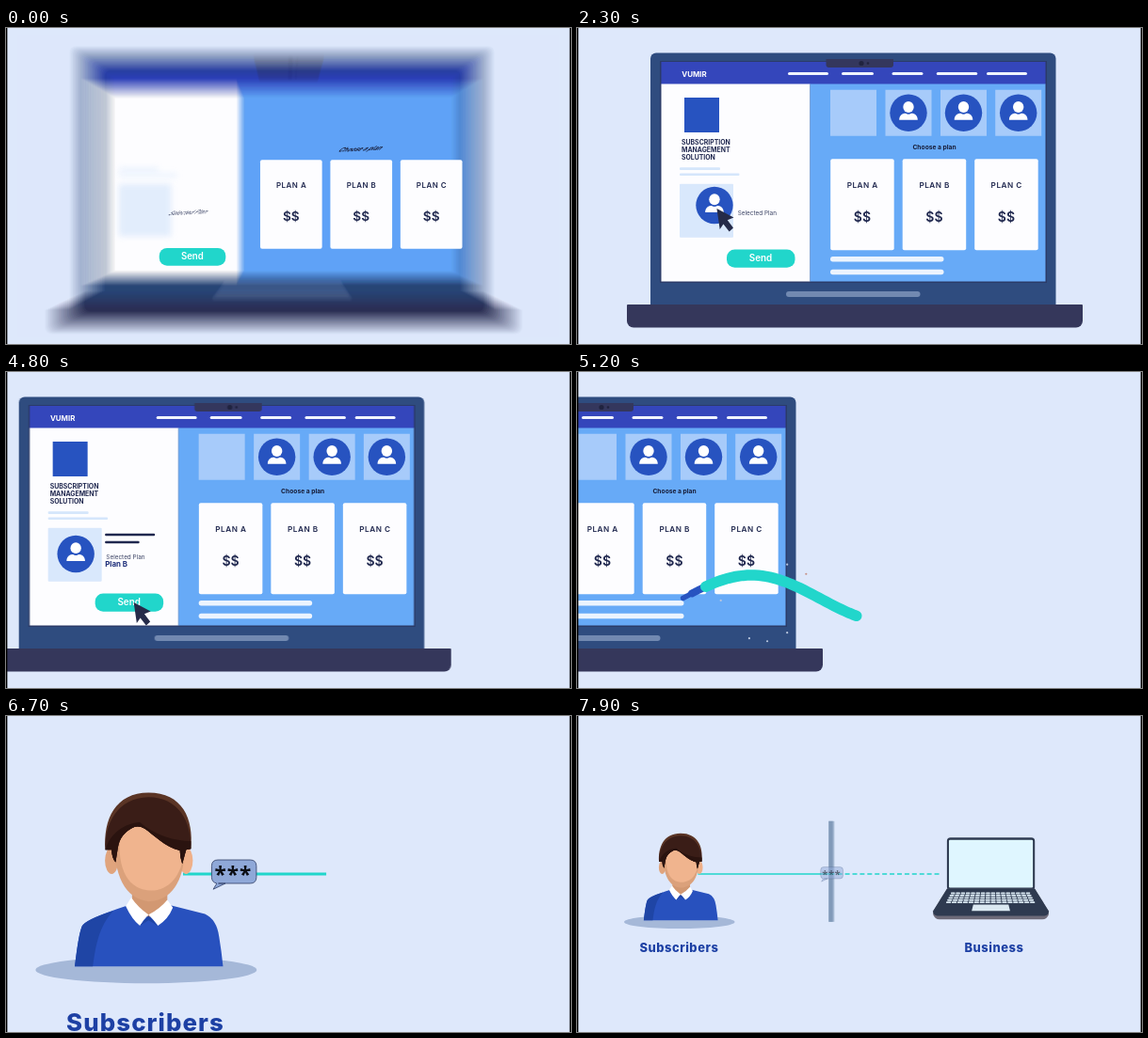
These frames come from a looping animation (600 by 336 pixels, 8 s). An HTML page with a canvas:

```html
<!DOCTYPE html>
<html lang="en">
<head>
<meta charset="utf-8">
<title>Subscription flow</title>
<style>
html, body { margin: 0; width: 100%; height: 100%; overflow: hidden; background: #dee8fb; }
canvas { display: block; width: 600px; height: 336px; }
</style>
</head>
<body>
<canvas id="stage"></canvas>
<script>
const W = 600, H = 336, LOOP = 8000;
const BG = '#dee8fb', BLUE = '#2753c0', TEAL = '#21d6cb', INK = '#20284f', WHITE = '#fdfdff';
const FONT = 'Inter, "Open Sans", sans-serif';
const ratio = window.devicePixelRatio || 1;

function makeCanvas(el) {
  el.width = W * ratio;
  el.height = H * ratio;
  const c = el.getContext('2d');
  c.scale(ratio, ratio);
  return c;
}
const stage = document.getElementById('stage');
const ctx = makeCanvas(stage);
const shell = document.createElement('canvas');

// Timing helpers
const clamp = v => Math.max(0, Math.min(1, v));
const span = (t, a, b) => clamp((t - a) / (b - a));
const mix = (a, b, p) => a + (b - a) * p;
const easeOut = p => 1 - (1 - p) ** 3;
const inOut = (p, n = 3) => p < .5 ? (2 * p) ** n / 2 : 1 - (2 - 2 * p) ** n / 2;
function pop(t, start) {
  const p = span(t, start, start + 400);
  return p < .6 ? 1.12 * Math.sin(p / .6 * Math.PI / 2) : mix(1.12, 1, inOut((p - .6) / .4, 2));
}
// Springy entrance: rises past full size, then settles
const zoomIn = t => 1 + .6 * Math.exp(-t / 110) * Math.sin((t - 6) / 110);

// Drawing helpers
function box(c, x, y, w, h, fill, r = 0) {
  c.fillStyle = fill;
  c.beginPath();
  c.roundRect(x, y, w, h, r);
  c.fill();
}
function oval(x, y, rx, ry, fill) {
  ctx.fillStyle = fill;
  ctx.beginPath();
  ctx.ellipse(x, y, rx, ry, 0, 0, Math.PI * 2);
  ctx.fill();
}
function shape(d, fill) {
  ctx.fillStyle = fill;
  ctx.fill(new Path2D(d));
}
function label(str, x, y, size, weight = 600, fill = INK, align = 'left', spacing = 0) {
  ctx.font = `${weight} ${size}px ${FONT}`;
  ctx.letterSpacing = spacing + 'px';
  ctx.textAlign = align;
  ctx.textBaseline = 'alphabetic';
  ctx.fillStyle = fill;
  ctx.fillText(str, x, y);
}
function scaled(x, y, s, draw) {
  if (s <= 0) return;
  ctx.save();
  ctx.translate(x, y);
  ctx.scale(s, s);
  draw();
  ctx.restore();
}

// Big laptop
function paintShell() {
  const c = makeCanvas(shell);
  box(c, 0, 0, W, H, BG);
  box(c, 78, 26.5, 430.5, 275, '#2f4c7f', 6);
  box(c, 88, 35, 411, 236, '#2b3b68');
  box(c, 89.5, 36, 408, 24, '#3446bb');
  box(c, 89.5, 59.5, 158, 210, WHITE);
  box(c, 247.5, 59.5, 250, 210, '#67aaf7');
  box(c, 264.5, 33, 71.5, 9, '#34375d', [0, 0, 3, 3]);
  c.fillStyle = '#20233f';
  c.beginPath();
  c.arc(302, 37.5, 2.6, 0, 7);
  c.arc(309, 37.5, 1.3, 0, 7);
  c.fill();
  box(c, 222, 280, 142.5, 6, '#7289b1', 3);
  box(c, 53, 294, 484, 24.5, '#35375b', [1, 1, 7, 7]);
}
paintShell();

// Averages the shell over a short shutter time
function drawShell(t) {
  const lo = zoomIn(t - 15), hi = zoomIn(t + 15);
  const n = Math.abs(hi - lo) > .002 ? 24 : 1;
  for (let i = 0; i < n; i++) {
    const s = n > 1 ? mix(lo, hi, i / (n - 1)) : 1;
    ctx.globalAlpha = 1 / (i + 1);
    scaled(298, 178, s, () => ctx.drawImage(shell, -298, -178, W, H));
  }
  ctx.globalAlpha = 1;
}

function avatar(x, y, s) {
  scaled(x, y, s, () => {
    oval(0, 0, 19.7, 19.7, BLUE);
    oval(0, -6.3, 5.7, 5.9, '#fff');
    shape('M-9.8 7.5C-9.8 2 -6 .4 -3 .4Q0 2.4 3 .4C6 .4 9.8 2 9.8 7.5Z', '#fff');
  });
}

function cursor(t) {
  if (t < 1000) return;
  const stops = [
    [1000, -20, 215], [1650, 296, 94], [1800, 296, 94], [2450, 141, 197],
    [2800, 141, 197], [3450, 362, 199], [4000, 362, 199], [4340, 200, 245], [8000, 200, 245]
  ];
  let x = 0, y = 0;
  for (let i = 1; i < stops.length; i++) {
    const [a, ax, ay] = stops[i - 1], [b, bx, by] = stops[i];
    if (t >= a && t <= b) {
      const p = inOut((t - a) / (b - a));
      x = mix(ax, bx, p);
      y = mix(ay, by, p);
    }
  }
  const press = at => Math.sin(span(t, at, at + 200) * Math.PI) * .16;
  const s = 1 - press(1630) - press(3470) - press(4360);
  scaled(x, y, s, () => shape('M0 0L18 9.5L11.3 12.3L17.5 20.5L13.2 24.5L7 16.5L3.2 22Z', '#252b49'));
}

function flipText(str, x, y, size, weight, fill, p) {
  ctx.save();
  ctx.translate(x, y);
  ctx.transform(1, -.05 * (1 - p), -1.2 * (1 - p), 1, 0, 0);
  if (p < 1) ctx.filter = `blur(${.7 * (1 - p)}px)`;
  label(str, 0, size * .36, size, weight, fill, 'center');
  ctx.restore();
}

function leftPanel(t, p) {
  scaled(132, 92, pop(t, 120), () => box(ctx, -18, -18, 37, 37, BLUE));
  ['SUBSCRIPTION', 'MANAGEMENT', 'SOLUTION'].forEach((word, i) => {
    ctx.globalAlpha = span(t, 150 + i * 70, 400 + i * 70);
    label(word, 111, 123.5 + i * 8.1, 6.9, 700);
  });
  ctx.globalAlpha = mix(.75, 1, p);
  ctx.save();
  if (p < 1) ctx.filter = `blur(${3 * (1 - p)}px)`;
  ctx.translate(6 * (1 - p), 0);
  box(ctx, 109, 148.3, 43, 2.6, '#d5e6fb', 1);
  box(ctx, 109, 154.5, 63.5, 2.6, '#d5e6fb', 1);
  box(ctx, 109, 165.7, 57, 57, '#d9e8fc', 1);
  ctx.restore();
  ctx.globalAlpha = 1;
  flipText('Selected Plan', 191.3, 196.5, 6.4, 400, '#3b4364', p);

  const l1 = easeOut(span(t, 2450, 2750)), l2 = easeOut(span(t, 2580, 2880));
  if (l1) box(ctx, 169.5, 171.7, 53 * l1, 2.5, INK, 1);
  if (l2) box(ctx, 169.5, 179.7, 36.5 * l2, 2.5, INK, 1);
  scaled(169.5, 206.5, pop(t, 3500), () => label('Plan B', 0, 0, 7.9, 700, '#1b2c78'));

  const press = 1 - .08 * Math.sin(span(t, 4360, 4560) * Math.PI);
  scaled(195, 245, press, () => {
    box(ctx, -36, -9.5, 72.5, 19.3, TEAL, 8.5);
    label('Send', 0, 3.4, 9.9, 600, '#fff', 'center');
  });
}

function rightPanel(t, p) {
  [293.5, 352, 410.5, 468.7].forEach((x, i) => {
    const s = pop(t, 100 + i * 75);
    scaled(x, 90.3, s, () => box(ctx, -24.5, -24.5, 49, 49, '#a7cbfa'));
    if (i) avatar(x, 90.3, s);
  });
  flipText('Choose a plan', 379.5, 127, 6.7, 700, '#161b36', p);
  ['A', 'B', 'C'].forEach((plan, i) => {
    const x = 269.2 + i * 76.5;
    box(ctx, x, 139.3, 67.5, 97, WHITE, 2);
    label('PLAN ' + plan, x + 34, 169.8, 8.2, 600, INK, 'center', .5);
    label('$$', x + 33.7, 206, 14, 600, INK, 'center');
  });
  for (let i = 0; i < 2; i++) {
    const w = 120.5 * easeOut(span(t, 250 + i * 120, 600 + i * 120));
    if (w) box(ctx, 269, 243 + i * 13.8, w, 5.4, '#ecf4fe', 2.7);
  }
}

function header(t) {
  scaled(124.5, 51.8, pop(t, 180), () => label('VUMIR', 0, 0, 7.9, 700, '#fff', 'center'));
  [[245.5, 43], [298, 34], [351, 33], [403.5, 43.5], [456.5, 43]].forEach(([x, w], i) => {
    scaled(x, 48.5, pop(t, 300 + i * 130), () => box(ctx, -w / 2, -1.6, w, 3.2, '#f0f4ff', 1.6));
  });
}

function panX(t) {
  return -276 * inOut(span(t, 4580, 5150)) - 290 * span(t, 5380, 5700) ** 2;
}

function checkout(t) {
  ctx.save();
  ctx.translate(panX(t), 0);
  drawShell(t);
  const p = easeOut(span(t, 0, 400));
  scaled(298, 178, zoomIn(t), () => {
    ctx.translate(-298, -178);
    header(t);
    rightPanel(t, p);
    leftPanel(t, p);
    const drag = inOut(span(t, 1800, 2450));
    avatar(mix(293.5, 138.5, drag), mix(90.3, 193.5, drag), pop(t, 100));
    cursor(t);
  });
  ctx.restore();
}

// Flying ribbon: a wave to the right that curls back to the centre
function flight(u) {
  const x = mix(-81, 400, Math.min(u, 1));
  const y = 216 + 25 * (1 - Math.cos(.0214 * (x - 185)));
  if (u <= 1) return [x, y];
  const a = (u - 1) * Math.PI;
  return [400 + 180 * Math.sin(a) - 66 * (u - 1), 200 + 57 * Math.cos(a)];
}
function strand(a, b, width, color) {
  if (b <= a) return;
  ctx.beginPath();
  for (let i = 0; i <= 40; i++) ctx.lineTo(...flight(mix(a, b, i / 40)));
  ctx.lineWidth = width;
  ctx.lineCap = ctx.lineJoin = 'round';
  ctx.strokeStyle = color;
  ctx.stroke();
}
function ribbon(t) {
  if (t < 4980 || t > 5520) return;
  const head = Math.min(2, .78 + (t - 5200) * .0055);
  const tail = Math.max(0, .397 + (t - 5200) * .0055);
  const joint = Math.min(head, tail + .05);
  if (tail < head) {
    strand(tail, joint, 5.5, BLUE);
    strand(mix(tail, joint, .4), joint, 8, BLUE);
    strand(joint, head, 11.5, TEAL);
  }
  const p = span(t, 5050, 5350);
  ctx.globalAlpha = Math.sin(p * Math.PI);
  [[243, 215], [223, 205], [223, 277], [183, 283], [202, 286], [153, 243]].forEach(([x, y], i) => {
    const k = p * 2;
    oval(mix(195, x, k), mix(250, y, k), 1.1, 1.1, i ? '#b9c6de' : '#c58f84');
  });
  ctx.globalAlpha = 1;
}

// Subscriber to business
function person() {
  const hairline = 'L316 137L311 155Q308 146 308 138C289 134 274 117 263 110Q256 106 250 108Q232 116 229 134L226 153Q221 147 221 137Z';
  oval(265, 290.5, 141, 17, '#a5b8d8');
  shape('M174 286C177 263 179 246 183 235Q187 226 242 208H296L340 219Q355 226 358 248Q361 266 363 286Z', '#2851be');
  shape('M174 286C177 263 179 246 183 235Q187 226 223 215C205 235 201 257 197 286Z', '#1f45a5');
  shape('M247 186H292V205L268 224L247 203Z', '#d29872');
  oval(221, 151, 8.5, 17, '#e0a47d');
  oval(316, 151, 8.5, 17, '#efb089');
  shape('M224 118C223 170 238 200 268 203C297 202 313 178 314 138L300 100H238Z', '#dba17b');
  shape('M232 118C227 165 244 191 275 189C298 186 312 166 314 134L300 100H240Z', '#f0b48e');
  shape('M246 198L239 209Q247 226 257 234Q262 226 268 220Q254 210 246 198Z', '#fff');
  shape('M292 201L299 211Q293 226 280 234Q274 226 268 220Q282 213 292 201Z', '#fff');
  shape('M257 234L268 221L280 234L268 227Z', '#1f45a5');
  shape('M213 137C210 98 226 64 268 64C311 64 326 97 322 136' + hairline, '#5a3425');
  shape('M213 137C212 104 228 71 268 70C306 70 323 101 322 136' + hairline, '#3a1d17');
  shape('M213 137C219 116 238 103 257 102C276 119 302 126 322 126V136' + hairline, '#2a130f');
}

function notebook() {
  box(ctx, 947, 75, 224, 135, '#2e3a50', 9);
  box(ctx, 952, 81, 214, 122, '#dff6ff', 3);
  shape('M947 206H1171L1206 262V272Q1202 284 1190 284H928Q916 284 912 272V262Z', '#6d6a78');
  shape('M947 206H1171L1206 262V268Q1202 275 1190 275H928Q916 275 912 268V262Z', '#2e3a50');
  for (let r = 0; r < 5; r++) {
    const half = 102 + r * 3, step = half * 2 / 16;
    for (let k = 0; k < 16; k++) box(ctx, 1059 - half + k * step, 215 + r * 5.8, step - 2, 4.4, '#d7e6f0', 1);
  }
  shape('M1014 246H1104L1108 262H1010Z', '#dbe9f2');
}

function bubble(t) {
  const move = 295 * span(t, 6300, 7900) ** 2;
  ctx.globalAlpha = 1 - .5 * span(t, 7780, 7900);
  scaled(358.5 + move, 165, pop(t, 5690), () => {
    const d = 'M-20 15H20.5Q28.5 15 28.5 7V-7Q28.5 -15 20.5 -15H-20.5Q-28.5 -15 -28.5 -7V7Q-28.5 13.5 -22 15L-26.5 22.5L-11 15Z';
    shape(d, '#8fa8d8');
    ctx.lineWidth = 1;
    ctx.strokeStyle = '#34436a';
    ctx.stroke(new Path2D(d));
    ctx.font = '700 27px "Open Sans", "Noto Sans", sans-serif';
    ctx.letterSpacing = '1.2px';
    ctx.textAlign = 'center';
    ctx.fillStyle = '#0b0d14';
    ctx.fillText('***', -1, 13.5);
  });
  ctx.globalAlpha = 1;
}

function wire(a, b, dash) {
  if (b <= a) return;
  ctx.beginPath();
  ctx.moveTo(a, 168);
  ctx.lineTo(b, 168);
  ctx.lineWidth = 3.6;
  ctx.lineCap = 'butt';
  ctx.strokeStyle = TEAL;
  ctx.setLineDash(dash);
  ctx.stroke();
  ctx.setLineDash([]);
}

function exchange(t) {
  if (t < 5500) return;
  const p = inOut(span(t, 6100, 7920), 1.35);
  const zoom = mix(1, .415, p);
  const focus = mix(300, 725, p ** .85);
  ctx.save();
  ctx.translate(300, 168);
  ctx.scale(zoom, zoom);
  ctx.translate(-focus, -168);

  const grow = easeOut(span(t, 6800, 7000));
  if (grow) {
    box(ctx, 645, 161.5 - 128.5 * grow, 15, 257 * grow, '#a4b9d2');
    box(ctx, 646, 161.5 - 128.5 * grow, 10, 257 * grow, '#819ab9');
  }
  if (t > 5800) {
    wire(312, mix(312, 328, span(t, 5800, 6080)) + 332 * inOut(span(t, 6150, 7250), 2), []);
    wire(668, mix(668, 932, span(t, 7350, 7850)), [12, 7]);
  }
  if (t > 6100) {
    notebook();
    label('Subscribers', 264, 368, 31, 800, '#1d40a4', 'center', 1.3);
    label('Business', 1067, 368, 31, 800, '#1d40a4', 'center', 1.3);
  }
  scaled(265, 290, pop(t, 5500), () => {
    ctx.translate(-265, -290);
    person();
  });
  bubble(t);
  ctx.restore();
}

function render(t) {
  ctx.setTransform(ratio, 0, 0, ratio, 0, 0);
  ctx.globalAlpha = 1;
  box(ctx, 0, 0, W, H, BG);
  if (t < 5700) checkout(t);
  ribbon(t);
  exchange(t);
  box(ctx, 0, 0, 1.4, H, '#000');
  box(ctx, 598.6, 0, 1.4, H, '#000');
}

const began = performance.now();
function tick() {
  render((performance.now() - began) % LOOP);
  requestAnimationFrame(tick);
}
tick();
</script>
</body>
</html>
```
